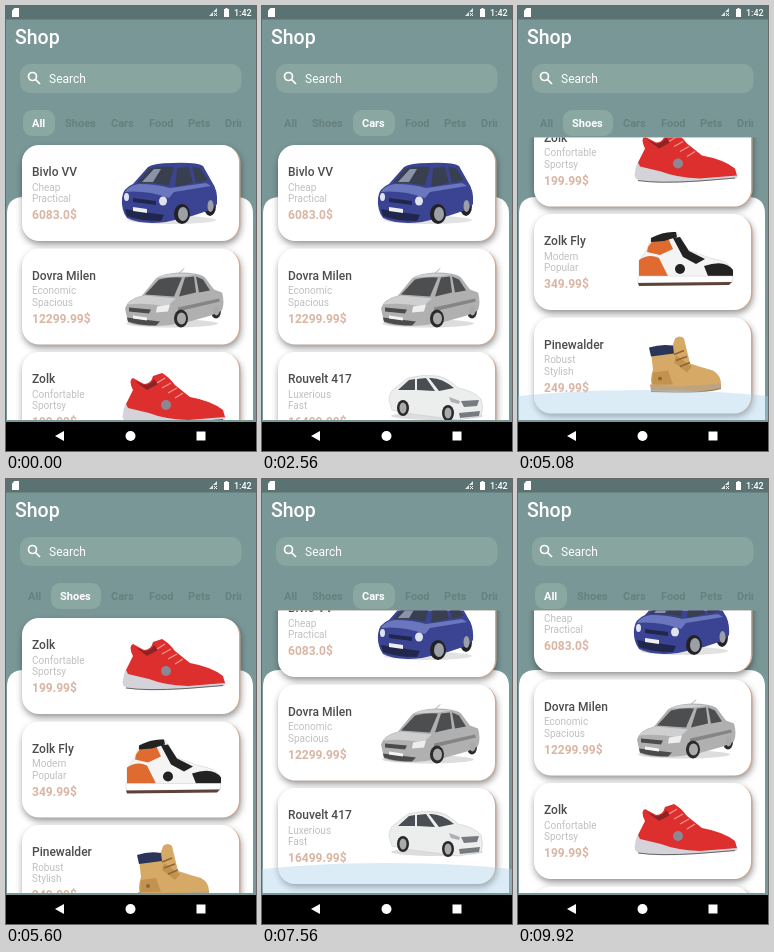
Recreate the animation shown at these times as an HTML page. Size 250x445 px, loop 10000 ms.

```html
<!DOCTYPE html>
<html lang="en">
<head>
<meta charset="utf-8">
<title>Shop</title>
<style>
  html, body { margin: 0; width: 100%; height: 100%; overflow: hidden; background: #7a9797; }
  svg { display: block; }
  #stage { width: 100vw; height: 100vh; }
  text { font-family: Roboto, sans-serif; fill: #fff; }
  .tab { font-size: 11px; font-weight: 700; }
  .name { font-size: 12px; font-weight: 500; fill: #4c4c4c; }
  .note { font-size: 10px; fill: #c0c0c0; }
  .price { font-size: 12px; font-weight: 700; fill: #dab5a4; }
  .back { filter: drop-shadow(0 3px 3.5px rgba(0, 0, 0, .45)); }
</style>
</head>
<body>
<svg id="stage" viewBox="0 0 250 445">
  <defs>
    <clipPath id="listClip"><rect y="131.5" width="250" height="282.5"/></clipPath>
    <clipPath id="tabClip"><rect width="235.5" height="140"/></clipPath>
    <g id="bluecar">
      <ellipse cx="166" cy="214" rx="44" ry="4" fill="#e2e2e2"/>
      <ellipse cx="204" cy="200" rx="6" ry="10" fill="#222"/>
      <path fill="#3b4493" d="M116 192Q117 182 127 178L142 161Q148 157 166 157Q191 156 197 160L206 176Q212 184 211 198L207 203L186 210L160 216Q135 219 121 212Q115 204 116 192Z"/>
      <path fill="#6a76bd" d="M119 186Q123 179 133 178Q150 178 164 182L200 177L205 180L168 186L163 192Q140 184 119 186Z"/>
      <path fill="#38404f" d="M131 177L144 162Q154 160 168 161L163 180Q146 176 131 177ZM171 162L183 161L187 177L169 181ZM186 161L194 162L202 174L190 177Z"/>
      <path fill="#8a94a8" d="M136 176L148 163H155L147 176Z"/>
      <path fill="#20264c" d="M119 203L158 209L155 215Q133 215 121 210ZM127 192L150 195V199L127 196Z"/>
      <path fill="#eee" d="M127 201L141 203V207L127 205Z"/>
      <ellipse cx="120.500" cy="191" rx="2.500" ry="4" fill="#dfe3ef"/>
      <ellipse cx="157" cy="195" rx="4" ry="4.500" fill="#dfe3ef"/>
      <ellipse cx="176" cy="208" rx="8" ry="10" fill="#222"/>
      <ellipse cx="177" cy="208" rx="5" ry="7" fill="#9c9fa8"/>
      <ellipse cx="204.500" cy="200" rx="3" ry="6" fill="#9c9fa8"/>
    </g>
    <g id="sedan">
      <ellipse cx="166" cy="214" rx="46" ry="4" fill="#ddd"/>
      <ellipse cx="210" cy="201" rx="5" ry="8" fill="#2b2b2b"/>
      <path stroke="#777" stroke-width=".7" d="M172 165L178 159"/>
      <path fill="#b0b0b0" d="M119 199Q121 190 136 186L150 169Q156 164 173 163Q193 163 199 168L208 180L216 183Q219 193 216 201L205 206L180 213Q140 220 122 213Z"/>
      <path fill="#cfcfcf" d="M121 195Q125 189 138 186L170 189L161 197Q140 193 121 195ZM152 168Q158 164 173 164L190 165L176 167Z"/>
      <path fill="#4c4e50" d="M139 185L153 170Q164 167 176 168L168 187ZM179 168L188 167L190 183L173 187ZM190 167L197 170L204 181L193 183Z"/>
      <path fill="#858585" d="M172 198L213 189L214 192L172 202Z"/>
      <path fill="#4a4b4d" d="M123 198L145 200L143 204L123 202ZM121 208L154 212L150 216Q132 216 122 212Z"/>
      <path fill="#eee" d="M151 197L164 195L162 202L150 203Z"/>
      <path fill="#f2f2f2" d="M127 206L141 208V211L127 209Z"/>
      <ellipse cx="175" cy="209" rx="7" ry="9" fill="#2b2b2b"/>
      <ellipse cx="175.500" cy="209" rx="4.500" ry="6" fill="#aaa"/>
      <ellipse cx="210.500" cy="201" rx="3" ry="5" fill="#aaa"/>
    </g>
    <g id="hatch">
      <ellipse cx="175" cy="203" rx="46" ry="4" fill="#ddd"/>
      <path fill="#eceded" stroke="#ccc" stroke-width=".6" d="M127 187Q127 179 133 175L146 165Q160 161 176 163Q186 165 196 175Q212 178 219 186Q222 195 219 203L196 207L150 201L130 197Z"/>
      <path fill="#4a4d52" d="M136 177L147 167L153 166L153 177ZM155 166L164 165L173 178L155 177ZM167 165Q179 164 192 175L177 178Z"/>
      <path fill="#777a7e" d="M199 188L217 187L215 193L202 194ZM197 200L218 198L217 203L198 205Z"/>
      <path fill="#aab0b5" d="M187 184L198 188L197 191L189 189Z"/>
      <ellipse cx="141" cy="195" rx="6" ry="8" fill="#292929"/>
      <ellipse cx="141" cy="195" rx="3.500" ry="5.500" fill="#aaa"/>
      <ellipse cx="186" cy="200" rx="6" ry="8" fill="#292929"/>
      <ellipse cx="186" cy="200" rx="3.500" ry="5.500" fill="#aaa"/>
    </g>
    <g id="runner">
      <path fill="#d3d3d9" d="M117 201Q118 189 125 188L150 198L180 205L217 202Q222 204 218 207L180 210Q140 213 121 209Q115 206 117 201Z"/>
      <path fill="#dd2f2e" d="M120 191L127 177Q122 167 127 165L138 171Q145 171 147 163L156 160Q162 163 169 172L184 184Q206 188 217 197L219 204L182 207Q158 206 143 200L122 195Z"/>
      <path fill="#8e2326" d="M129 168L138 172Q145 172 148 166L152 171L141 177Z"/>
      <path fill="none" stroke="#f1948c" stroke-width="1.300" d="M151 170L159 165M156 175L165 170M162 180L171 175M169 185L177 180"/>
      <path fill="none" stroke="#666" d="M120 209Q140 212 180 209.500L217 206.500"/>
      <circle cx="160" cy="192" r="5" fill="#8c8793"/>
    </g>
    <g id="hightop">
      <path fill="#f4f4f4" stroke="#ccc" stroke-width=".5" d="M121 186L128 176L134 162Q146 157 158 157L163 163L170 175L192 183Q212 186 215 196L214 207L121 208Z"/>
      <path fill="#df6b31" d="M121 185Q131 178 141 183L150 201H121ZM130 172L135 165L150 163L155 174L142 180L129 177Z"/>
      <path fill="#222" d="M133 163Q146 156 158 157L159 162L146 166L133 167ZM155 163L162 162L171 176L187 184L178 189L165 182ZM186 191Q207 184 215 195V201L190 201Z"/>
      <path fill="#fff" stroke="#ccc" stroke-width=".5" d="M120 201H215L214 207L120 208Z"/>
      <path fill="#5c4238" d="M120 208L214 207L211 210L121 211Z"/>
      <circle cx="162" cy="194" r="5" fill="#222"/>
    </g>
    <g id="boot">
      <path fill="#d6a967" d="M133 174L153 172L157 160Q162 156 166 160L172 185Q184 189 195 192Q204 197 203 208L135 210Q131 202 135 191Z"/>
      <path fill="#2b3558" d="M131 169Q143 165 155 167L156 175L133 178Z"/>
      <path fill="#c3924f" d="M158 177L174 188L169 194L156 184ZM135 194L150 192L155 206H134Z"/>
      <path fill="none" stroke="#8d6536" stroke-width="1.500" d="M156 176L166 172M158 182L169 178M162 188L172 184"/>
      <path fill="#bfa27f" d="M132 206L160 208L203 205V210Q190 214 158 213L133 213Z"/>
      <path fill="none" stroke="#93704a" d="M133 213L158 213.500Q190 214 203 210"/>
      <circle cx="142" cy="200" r="2" fill="#8f6434"/>
    </g>
  </defs>

  <rect width="250" height="445" fill="#7a9797"/>
  <rect width="250" height="13.500" fill="#5b7273"/>
  <path fill="#fff" d="M8.500 2H13V11H6V4.500Z"/>
  <path fill="#dfe6e6" d="M203 10L211 2V6H207V10Z"/>
  <path stroke="#fff" d="M208 7L211 10M211 7L208 10"/>
  <path fill="#fff" d="M218 3H219.500V2H221.500V3H223V11H218Z"/>
  <text x="228" y="10" font-size="9" font-weight="500">1:42</text>
  <text x="9" y="38" font-size="19.500" font-weight="500">Shop</text>
  <rect x="14" y="58" width="221.500" height="29" rx="10" fill="#88a5a0"/>
  <g fill="none" stroke="#fff" stroke-width="1.700"><circle cx="26.500" cy="70.500" r="4"/><path d="M29.500 73.500L34 78"/></g>
  <text x="43" y="76.500" font-size="12">Search</text>

  <g id="tabs" clip-path="url(#tabClip)"><rect id="pill" y="104" height="26" rx="9" fill="#8aa7a1"/></g>

  <path fill="#fff" d="M1 414V208Q1 191 18 191H230Q247 191 247 208V414Z"/>
  <g clip-path="url(#listClip)">
    <g id="list"></g>
    <ellipse id="glow" cx="125" cy="414" rx="205" fill="#a9cfec" opacity=".4"/>
  </g>

  <rect y="416" width="250" height="29" fill="#000"/>
  <path fill="#fff" d="M49 430L58 425V435Z"/>
  <circle cx="124.500" cy="430" r="5" fill="#fff"/>
  <rect x="190.500" y="425.500" width="9" height="9" fill="#fff"/>
</svg>
<script>
const LOOP = 10000, PITCH = 103.5, FADE = 340;
const $ = id => document.getElementById(id);

const goods = {
  bluecar: ['Bivlo VV', 'Cheap', 'Practical', '6083.0$'],
  sedan: ['Dovra Milen', 'Economic', 'Spacious', '12299.99$'],
  hatch: ['Rouvelt 417', 'Luxerious', 'Fast', '16499.99$'],
  runner: ['Zolk', 'Confortable', 'Sportsy', '199.99$'],
  hightop: ['Zolk Fly', 'Modern', 'Popular', '349.99$'],
  boot: ['Pinewalder', 'Robust', 'Stylish', '249.99$']
};
const lists = [
  ['bluecar', 'sedan', 'runner', 'hightop', 'boot', 'hatch'],
  ['runner', 'hightop', 'boot'],
  ['bluecar', 'sedan', 'hatch']
];
const tabs = [['All', 22], ['Shoes', 50], ['Cars', 96], ['Food', 134], ['Pets', 173], ['Drinks', 210]];
const pillWidth = [32, 50, 42];

// [time, tab index]
const taps = [[0, 0], [1320, 1], [2000, 2], [3000, 0], [3600, 1], [6120, 2], [8760, 0]];
// [time, value]
const scroll = [[0, 0], [80, 0], [500, 170], [620, 170], [1080, 0],
  [4800, 0], [4980, 37], [5020, 37], [5400, 0],
  [6920, 0], [7240, 37], [8000, 37], [8240, 0],
  [9560, 0], [9920, 42], [LOOP, 42]];
const glow = [[0, 0], [4880, 0], [4980, 1], [5080, 1], [5400, 0],
  [7160, 0], [7320, 1], [7560, 1], [7920, 0], [LOOP, 0]];

function valueAt(keys, t) {
  const i = keys.findIndex(k => k[0] > t);
  const [t0, a] = keys[i - 1], [t1, b] = keys[i];
  const u = (t - t0) / (t1 - t0);
  return a + (b - a) * u * u * (3 - 2 * u);
}

function card(id, i) {
  const [name, note1, note2, price] = goods[id];
  return `<g transform="translate(0 ${i * PITCH})">
    <rect class="back" x="17" y="140" width="217.500" height="95" rx="17" fill="#cfa892"/>
    <rect x="16" y="139" width="217" height="96" rx="17" fill="#fff"/>
    <text class="name" x="26" y="170">${name}</text>
    <text class="note" x="26" y="184.500">${note1}</text>
    <text class="note" x="26" y="196">${note2}</text>
    <text class="price" x="26" y="213">${price}</text>
    <use href="#${id}"/></g>`;
}

$('list').innerHTML = lists.map(ids => `<g>${ids.map(card).join('')}</g>`).join('');
$('tabs').innerHTML += tabs.map(([label]) => `<text class="tab" y="121">${label}</text>`).join('');
const groups = [...$('list').children];
const labels = document.querySelectorAll('.tab');

function draw() {
  const t = performance.now() % LOOP;
  const n = taps.filter(k => k[0] <= t).length - 1;
  const [start, tab] = taps[n];
  const before = n ? lists[taps[n - 1][1]] : lists[tab];
  const shown = Math.min(1, (t - start) / FADE);

  groups.forEach((g, i) => g.style.display = i === tab ? '' : 'none');
  groups[tab].querySelectorAll('use').forEach((pic, i) =>
    pic.setAttribute('opacity', before[i] === lists[tab][i] ? 1 : shown));

  labels.forEach((el, i) => {
    el.setAttribute('x', tabs[i][1] + (i === tab ? 4 : i > tab ? 9 : 0));
    el.style.fill = i === tab ? '#fff' : '#66817f';
  });
  $('pill').setAttribute('x', tabs[tab][1] - 5);
  $('pill').setAttribute('width', pillWidth[tab]);

  $('list').setAttribute('transform', `translate(0 ${-valueAt(scroll, t)})`);
  $('glow').setAttribute('ry', 30 * valueAt(glow, t));
  requestAnimationFrame(draw);
}
draw();
</script>
</body>
</html>
```
